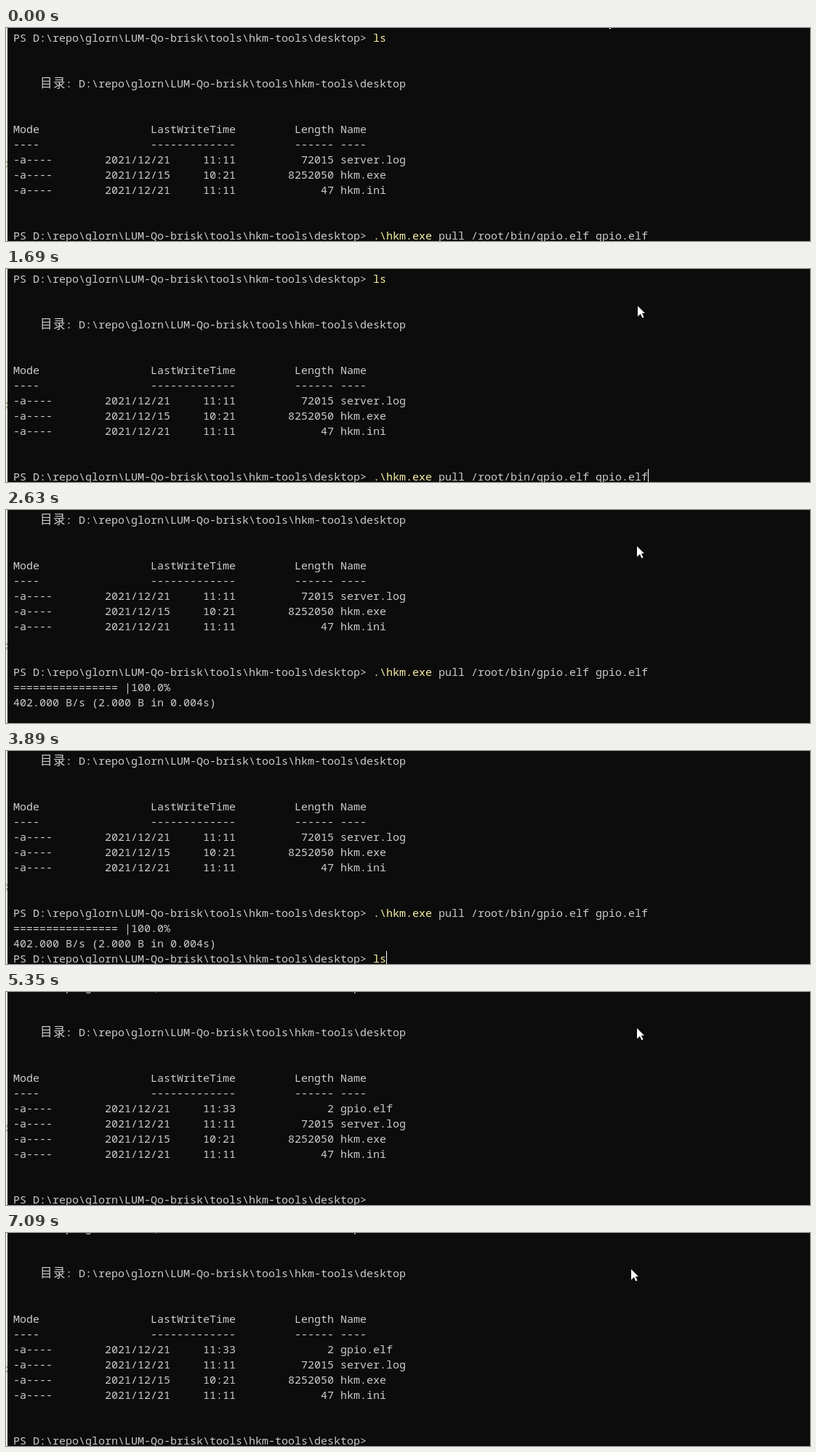
An HTML page that plays this animation: 1106 by 294 pixels, repeating every 7220 ms.

```html
<!DOCTYPE html>
<html lang="zh">
<head>
<meta charset="utf-8">
<title>Terminal session</title>
<style>
  html, body { margin: 0; width: 100%; height: 100%; overflow: hidden; background: #0c0c0c; }
  svg { display: block; }
  text { font: 500 15px "Noto Sans Mono", "Liberation Mono", monospace; fill: #ccc; white-space: pre; }
  .command { fill: #f9f1a5; }
  .wide { font: 16.5px "Noto Sans CJK SC", "Noto Sans CJK", sans-serif; }
</style>
</head>
<body>
<svg width="1106" height="294" viewBox="0 0 1106 294">
  <rect width="1106" height="294" fill="#0c0c0c"/>
  <g id="screen"></g>
  <rect id="caret" y="276" width="1" height="18" fill="#fff"/>
  <rect width="2" height="294" fill="#fff"/>
  <path d="M0 183L2.5 188L0 193" fill="none" stroke="#77744a"/>
  <path id="pointer" d="M0 0L10 10H6L8.5 15.5L6.3 16.5L4 11L0 14.5Z" fill="#fff"/>
</svg>
<script>
const LOOP = 7220, BLINK = 530, TICK = 67;
const CELL = 9, ROW = 21, LEFT = 10, BASELINE = 19, LAST_ROW = 13;
const PATH = "D:\\repo\\glorn\\LUM-Qo-brisk\\tools\\hkm-tools\\desktop";
const PROMPT = `PS ${PATH}> `;
const byId = id => document.getElementById(id);
const screen = byId("screen"), caret = byId("caret"), pointer = byId("pointer");

// A line is a list of { column, text, kind } parts.
const part = (column, text, kind = "") => ({ column, text, kind });
const plain = text => [part(0, text)];
const prompt = (command = "", rest = "") => [
  part(0, PROMPT),
  part(PROMPT.length, command, "command"),
  part(PROMPT.length + command.length, rest)
];
const file = (date, time, size, name) =>
  plain("-a----".padEnd(14) + date.padEnd(15) + time + size.padStart(15) + " " + name);
const heading = (mode, time, size, name) =>
  plain(mode.padEnd(21) + time.padEnd(22) + size + " " + name);
const listing = files => [
  [], [],
  [part(4, "目", "wide"), part(6, "录", "wide"), part(8, ": " + PATH)],
  [], [],
  heading("Mode", "LastWriteTime", "Length", "Name"),
  heading("----", "-------------", "------", "----"),
  ...files, [], []
];

const files = [
  file("2021/12/21", "11:11", "72015", "server.log"),
  file("2021/12/15", "10:21", "8252050", "hkm.exe"),
  file("2021/12/21", "11:11", "47", "hkm.ini")
];
const pulled = file("2021/12/21", "11:33", "2", "gpio.elf");
const pull = prompt(".\\hkm.exe", " pull /root/bin/gpio.elf gpio.elf");
const typedLine = prompt("ls");
const lines = [
  prompt("ls"),
  ...listing(files),
  pull,
  plain("================ |100.0%"),
  plain("402.000 B/s (2.000 B in 0.004s)"),
  typedLine,
  ...listing([pulled, ...files]),
  prompt()
];

function svg(name, attributes, parent) {
  const node = document.createElementNS("http://www.w3.org/2000/svg", name);
  for (const key in attributes) node.setAttribute(key, attributes[key]);
  parent.append(node);
  return node;
}

const rows = lines.map((parts, row) => {
  const group = svg("g", {}, screen);
  for (const { column, text, kind } of parts) {
    const x = LEFT + column * CELL + (kind === "wide" ? 1 : 0);
    svg("text", { x, y: BASELINE + row * ROW, class: kind }, group).textContent = text;
  }
  return group;
});

const pullRow = lines.indexOf(pull), typedRow = lines.indexOf(typedLine);
const typed = rows[typedRow].querySelector(".command");
const lengthOf = parts => parts.reduce((sum, { text }) => sum + text.length, 0);

// The caret stands on `row` after `column` characters; `blink` restarts its phase.
const steps = [
  { at: 0, row: pullRow, column: lengthOf(pull), blink: -BLINK },
  { at: 1830, row: pullRow + 1, column: 0, blink: 1830 },
  { at: 2630, row: typedRow, column: 0, blink: 1830 },
  { at: 2700, row: typedRow, column: PROMPT.length, blink: 1830 },
  { at: 3760, row: typedRow, column: PROMPT.length + 1, blink: 3760 },
  { at: 3890, row: typedRow, column: PROMPT.length + 2, blink: 3890 },
  { at: 4300, row: lines.length - 1, column: PROMPT.length, blink: 4360 }
];

const glides = [
  { from: 130, to: 600, x: 881, y: 56 },
  { from: 1000, to: 1470, x: 869, y: 51 },
  { from: 1760, to: 1760, x: 868, y: 50 },
  { from: 5420, to: 5690, x: 861, y: 51 },
  { from: 7090, to: 7090, x: 860, y: 50 }
];
const isTyping = time => time >= 3760 && time < 5350;
const ease = p => p * p * (3 - 2 * p);

function pointerAt(time) {
  let x = 824, y = -15;
  for (const glide of glides) {
    if (time < glide.from) break;
    const elapsed = (Math.floor((time - glide.from) / TICK) + 1) * TICK;
    const progress = ease(Math.min(1, elapsed / (glide.to - glide.from + TICK)));
    x += (glide.x - x) * progress;
    y += (glide.y - y) * progress;
  }
  return [Math.round(x), Math.round(y)];
}

const show = (node, visible) => node.setAttribute("visibility", visible ? "visible" : "hidden");

function render(time) {
  const { row, column, blink } = steps.findLast(step => step.at <= time);
  screen.setAttribute("transform", `translate(0 ${(LAST_ROW - row) * ROW})`);
  rows.forEach((node, i) => show(node, i < row || (i === row && column > 0)));
  typed.textContent = row === typedRow ? "ls".slice(0, Math.max(0, column - PROMPT.length)) : "ls";

  caret.setAttribute("x", LEFT + column * CELL);
  show(caret, Math.floor(Math.max(0, time - blink) / BLINK) % 2 === 0);

  pointer.setAttribute("transform", `translate(${pointerAt(time)})`);
  show(pointer, !isTyping(time));
}

const began = performance.now();
function tick() {
  render((performance.now() - began) % LOOP);
  requestAnimationFrame(tick);
}
tick();
</script>
</body>
</html>
```
